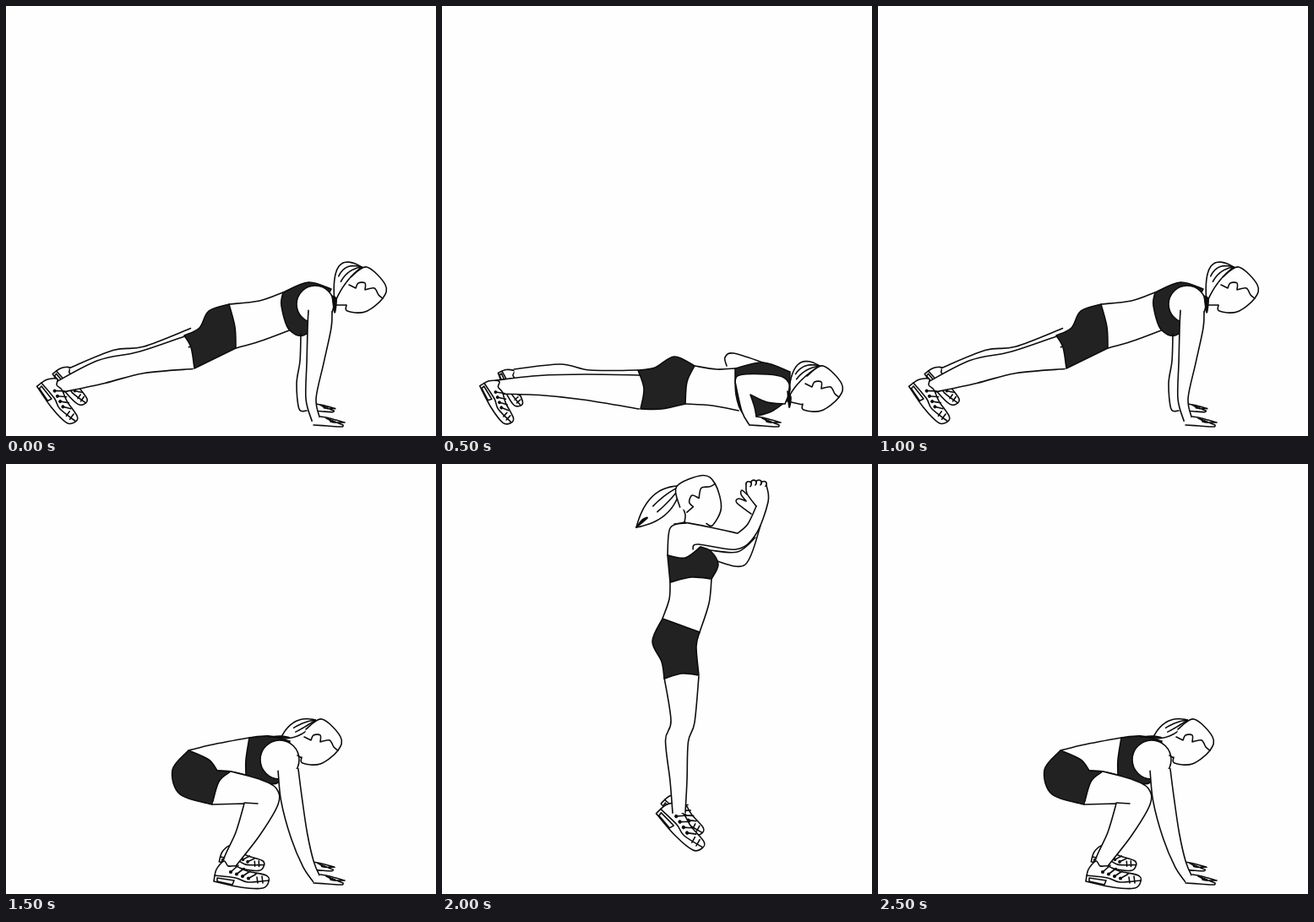
Recreate the animation shown at these times as an HTML page with a canvas. Size 509 by 509 pixels, loop 3 s.

```html
<!DOCTYPE html>
<html lang="en">
<head>
<meta charset="utf-8">
<title>Burpee</title>
<style>
  html, body { margin: 0; width: 100%; height: 100%; overflow: hidden; background: #fefefe; }
  canvas { display: block; width: 509px; height: 509px; }
</style>
</head>
<body>
<canvas id="stage" width="509" height="509"></canvas>
<script>
const ctx = document.getElementById('stage').getContext('2d');
const INK = '#0c0c0c', CLOTH = '#222', PAPER = '#fefefe';
const STEP = 500, LINE = 1.6;

function curve(pts) {
  for (let i = 0; i < pts.length - 1; i++) {
    const b = pts[i], c = pts[i + 1];
    const a = pts[i - 1] || b, d = pts[i + 2] || c;
    ctx.bezierCurveTo(b[0] + (c[0] - a[0]) / 6, b[1] + (c[1] - a[1]) / 6,
      c[0] - (d[0] - b[0]) / 6, c[1] - (d[1] - b[1]) / 6, c[0], c[1]);
  }
}

const points = text => text.trim().split(/\s+/).map(p => p.split(',').map(Number));

// Smooth line through "x,y" points; "|" marks a corner.
function draw(path, fill) {
  ctx.beginPath();
  let last = null;
  for (const part of path.split('|')) {
    const pts = points(part);
    if (last) pts.unshift(last);
    else ctx.moveTo(...pts[0]);
    curve(pts);
    last = pts[pts.length - 1];
  }
  if (fill) {
    ctx.fillStyle = fill;
    ctx.fill();
  }
  ctx.stroke();
}

// Tapered limb, open at both ends, along "x,y,radius" joints.
function limb(joints) {
  const nodes = points(joints);
  const edge = side => nodes.map(([x, y, r], i) => {
    const a = nodes[i - 1] || nodes[i], b = nodes[i + 1] || nodes[i];
    const dx = b[0] - a[0], dy = b[1] - a[1], k = side * r / Math.hypot(dx, dy);
    return [x - dy * k, y + dx * k];
  });
  const left = edge(1), right = edge(-1).reverse();
  ctx.fillStyle = PAPER;
  ctx.beginPath();
  ctx.moveTo(...left[0]);
  curve(left);
  ctx.lineTo(...right[0]);
  curve(right);
  ctx.fill();
  for (const side of [left, right]) {
    ctx.beginPath();
    ctx.moveTo(...side[0]);
    curve(side);
    ctx.stroke();
  }
}

function disc(x, y, r, fill) {
  ctx.beginPath();
  ctx.arc(x, y, r, 0, 2 * Math.PI);
  ctx.fillStyle = fill;
  ctx.fill();
  ctx.stroke();
}

function place(part, x, y, degrees = 0, scale = 1) {
  ctx.save();
  ctx.translate(x, y);
  ctx.rotate(degrees * Math.PI / 180);
  ctx.scale(scale, scale);
  ctx.lineWidth = LINE / scale;
  part();
  ctx.restore();
}

// Origin: centre of the skull.
function head() {
  draw('-19,-14 0,-26 22,-5 19,11 -2,27 -23,26 -24,19', PAPER);
  draw('-21,-5 -13,-1 | -10,-7 -2,-7 -2,1 | 9,-1 14,7 19,11');
}

// Origin: back of the sole.
function shoe() {
  draw('0,-4 3,-18 12,-28 17,-22 26,-22 40,-16 62,-11 65,-4 58,4 32,3 0,-4', PAPER);
  draw('1,-11 26,-8 40,-3 65,-5');
  draw('4,-8 24,-5 | 22,0 | 4,-4 | 4,-8');
  for (let i = 0; i < 4; i++) {
    const x = 20 + 7 * i, y = -15 + 2.5 * i;
    draw(`${x},${y} ${x + 9},${y - 8 + i}`);
    disc(x, y, 1.3, INK);
  }
  draw('51,-9 52,-2');
  draw('57,-10 58,-2');
}

// Origin: left of the wrist.
function hand() {
  draw('12,0 23,2 41,7 | 32,7 39,10 | 37,12 20,11 4,10', PAPER);
  draw('19,2 31,7 24,6', INK);
}

// Strands fan out between the outer and inner bend.
function ponytail(tip, root, outer, inner) {
  const strands = 4;
  for (let s = 0; s < strands; s++) {
    const k = s / (strands - 1);
    ctx.beginPath();
    for (let t = k % 1 ? 0.4 : 0; t <= 1.01; t += 0.05) {
      ctx.lineTo(...[0, 1].map(i => (1 - t) ** 2 * tip[i]
        + 2 * t * (1 - t) * (outer[i] + (inner[i] - outer[i]) * k) + t * t * root[i]));
    }
    ctx.stroke();
  }
}

function plank() {
  place(shoe, 53, 438, 42, 0.8);
  limb('222,391,10 165,412,9 130,416,9 78,436,8');
  limb('217,410,20 160,422,13 113,433,14 60,452,6.5');
  place(shoe, 34, 453, 43, 0.95);

  draw('264,353 300,349 328,339');
  draw('272,405 300,397 335,384');
  draw('264,353 240,361 229,381 211,390 | 219,404 223,429 | 272,405 | 271,380 264,353', CLOTH);
  draw('328,339 358,327 385,335 | 358,386 336,384 326,355 328,339', CLOTH);

  draw('349,388 348,420 344,447 347,477 356,479');
  place(hand, 357, 471, 0, 0.8);
  disc(366, 353, 22, PAPER);
  limb('372,361,14 371,380,14 366,422,10 361,465,6 367,490,5');
  place(hand, 360, 486);

  draw('403,354 389,354');
  ponytail([389, 352], [421, 309], [383, 286], [399, 326]);
  place(head, 427, 335);
  draw('386,343 391,347 389,363 386,343', INK);
}

function low() {
  place(shoe, 64, 436, 56, 0.72);
  limb('86,438,8 140,433,9 175,440,9 232,440,9');
  limb('64,451,8 115,449,11.5 168,451,15 235,457,20');
  place(shoe, 42, 452, 50, 0.88);

  draw('299,426 325,430 347,429');
  draw('288,471 320,473 351,479');
  draw('232,431 252,428 275,415 299,426 | 290,445 288,471 | 260,477 235,477 | 239,453 232,431', CLOTH);

  draw('337,426 335,416 345,411 380,422');
  draw('347,429 380,422 412,433 | 411,465 | 390,480 369,486 | 356,482 348,460 347,429', CLOTH);
  draw('364,496 355,480 347,445 | 352,437 385,436 405,440 412,453 406,471 | 385,469 365,460 | 370,475 372,486', PAPER);
  place(hand, 360, 486);

  draw('427,472 409,468');
  ponytail([410, 464], [447, 426], [413, 405], [420, 443]);
  place(head, 451, 452);
  draw('409,456 413,463 411,475 409,456', INK);
}

function squat() {
  place(shoe, 252, 474, 5, 0.82);
  draw('216,339 245,332 288,324');
  draw('250,363 266,364 284,368');
  draw('216,339 197,362 206,391 244,403 | 252,376 266,364 | 250,363 | 240,350 216,339', CLOTH);
  draw('288,324 312,322 336,328 | 322,377 284,368 | 284,350 288,324', CLOTH);
  draw('266,364 300,373 320,384 322,403 300,440 271,477 | 257,471 272,436 282,402 | 244,403', PAPER);
  draw('282,401 298,402');
  place(shoe, 246, 498);

  place(hand, 352, 471, 0, 0.9);
  disc(324, 350, 23, PAPER);
  limb('334,362,12 338,397,12.5 347,440,10 358,474,7 368,492,5');
  place(hand, 360, 486);

  draw('350,348 345,345');
  ponytail([325, 325], [366, 303], [339, 296], [353, 326]);
  place(head, 374, 328);
  draw('311,323 325,322 335,324 311,323', INK);
}

function jump() {
  place(shoe, 257, 405, 36, 0.92);
  place(shoe, 251, 417, 37, 1.05);
  limb('283.5,252,20.5 285,305,14 278,328,13.5 280,375,10 280.5,413,7.5');

  draw('287,69 270,76 267,108');
  draw('270,140 269,160 261,183');
  draw('319,136 316,165 305,199');
  draw('261,183 283,191 305,199 | 301,216 304,250 | 284,248 263,254 | 260,234 249,210 261,183', CLOTH);

  draw('317,102 350,104 371,87');
  draw('325,115 359,119 377,73');
  draw('267,108 288,111 306,98 | 318,103 327,119 319,136 | 295,134 270,140 | 267,108', CLOTH);
  draw('287,69 318,75 350,82 | 362,71 372,50');
  draw('297,101 303,95 348,101 371,84 386,45 384,25');

  for (let i = 0; i < 4; i++) {
    ctx.beginPath();
    ctx.arc(363 + 6 * i, 24 - 2 * Math.sin(i), 3.2, Math.PI, 2.3 * Math.PI);
    ctx.stroke();
  }
  draw('360,24 361,35 372,50');
  draw('361,36 355,31 354,36 360,44 | 351,41 349,46 366,59');

  draw('284,49 288,60 287,69');
  ponytail([230, 75], [283, 26], [243, 25], [275, 67]);
  place(head, 304, 38, -67, 1.1);
  draw('230,75 237,66 243,64 230,75', INK);
  draw('275,71 289,70');
}

const sequence = [plank, low, plank, squat, jump, squat];

function frame() {
  ctx.fillStyle = PAPER;
  ctx.fillRect(0, 0, 509, 509);
  ctx.strokeStyle = INK;
  ctx.lineWidth = LINE;
  ctx.lineCap = ctx.lineJoin = 'round';
  sequence[Math.floor(performance.now() / STEP) % sequence.length]();
  requestAnimationFrame(frame);
}
frame();
</script>
</body>
</html>
```
